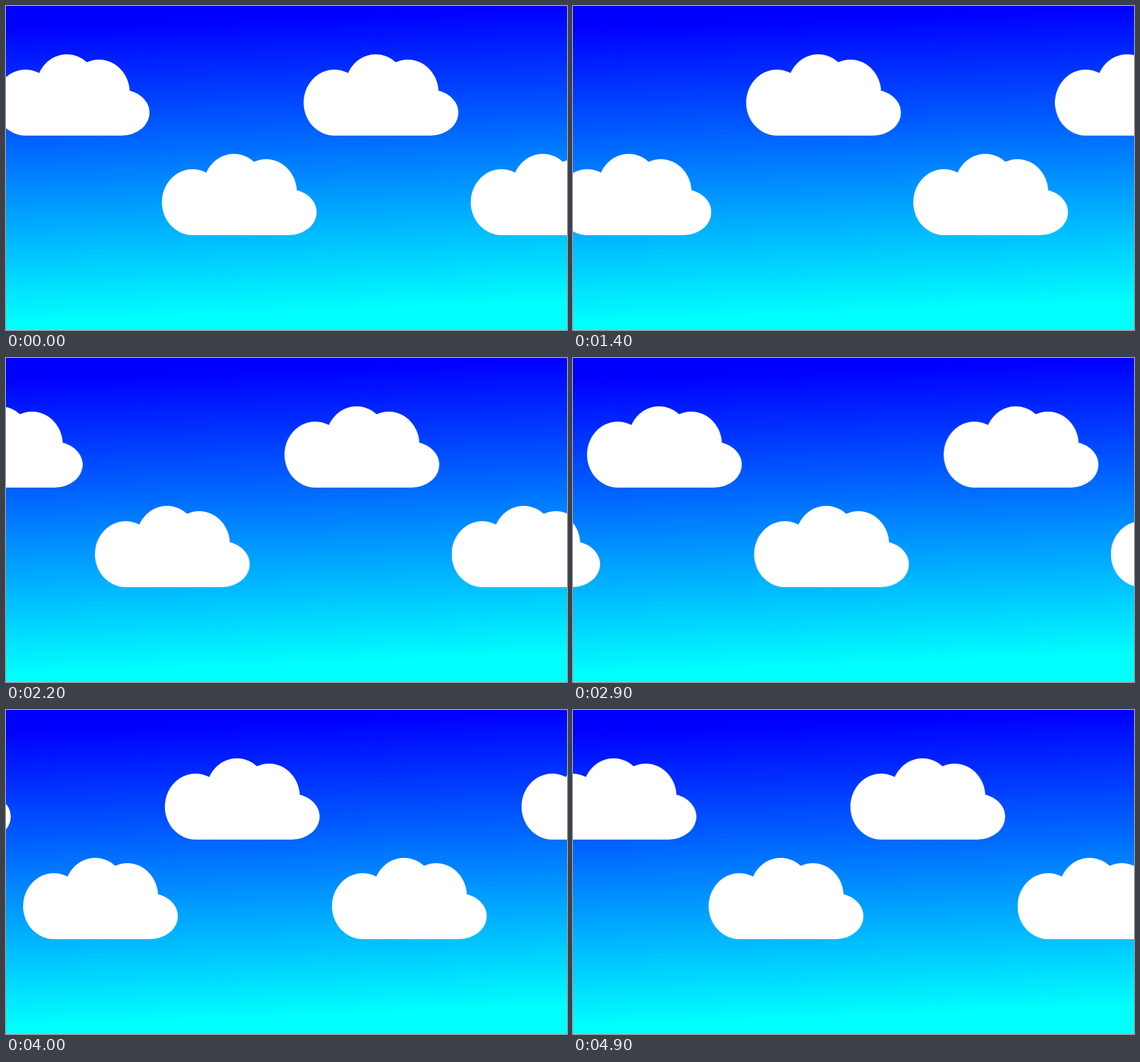
Recreate the animation shown at these times as an HTML page. Size 950x550 px, loop 5000 ms.

```html
<!DOCTYPE html>
<html lang="en">
<head>
<meta charset="utf-8">
<title>Drifting clouds</title>
<style>
  html, body { margin: 0; width: 100%; height: 100%; overflow: hidden; background: #00f; }
  svg { display: block; width: 950px; height: 550px; }
  /* ten hard steps a second */
  #drift { animation: drift 5s steps(50) infinite; }
  @keyframes drift {
    from { transform: translateX(0); }
    to { transform: translateX(1115px); }
  }
</style>
</head>
<body>
<svg viewBox="0 0 950 550" xmlns="http://www.w3.org/2000/svg">
  <defs>
    <linearGradient id="sky" gradientUnits="userSpaceOnUse" x1="466" y1="20" x2="484" y2="522">
      <stop offset="0" stop-color="#00f"/>
      <stop offset="1" stop-color="#0ff"/>
    </linearGradient>
    <g id="cloud">
      <ellipse cx="52" cy="164" rx="52" ry="56"/>
      <ellipse cx="122" cy="138" rx="52" ry="56"/>
      <ellipse cx="176.5" cy="147" rx="52" ry="56"/>
      <ellipse cx="215" cy="181" rx="47" ry="39"/>
      <rect x="52" y="150" width="163" height="70"/>
    </g>
    <g id="row">
      <use href="#cloud" x="504"/>
      <use href="#cloud" x="-19"/>
      <use href="#cloud" x="-623"/>
      <use href="#cloud" x="-1146"/>
    </g>
  </defs>
  <rect width="950" height="550" fill="url(#sky)"/>
  <g id="drift" fill="#fff">
    <use href="#row"/>
    <use href="#row" x="283" y="169"/>
  </g>
</svg>
</body>
</html>
```
